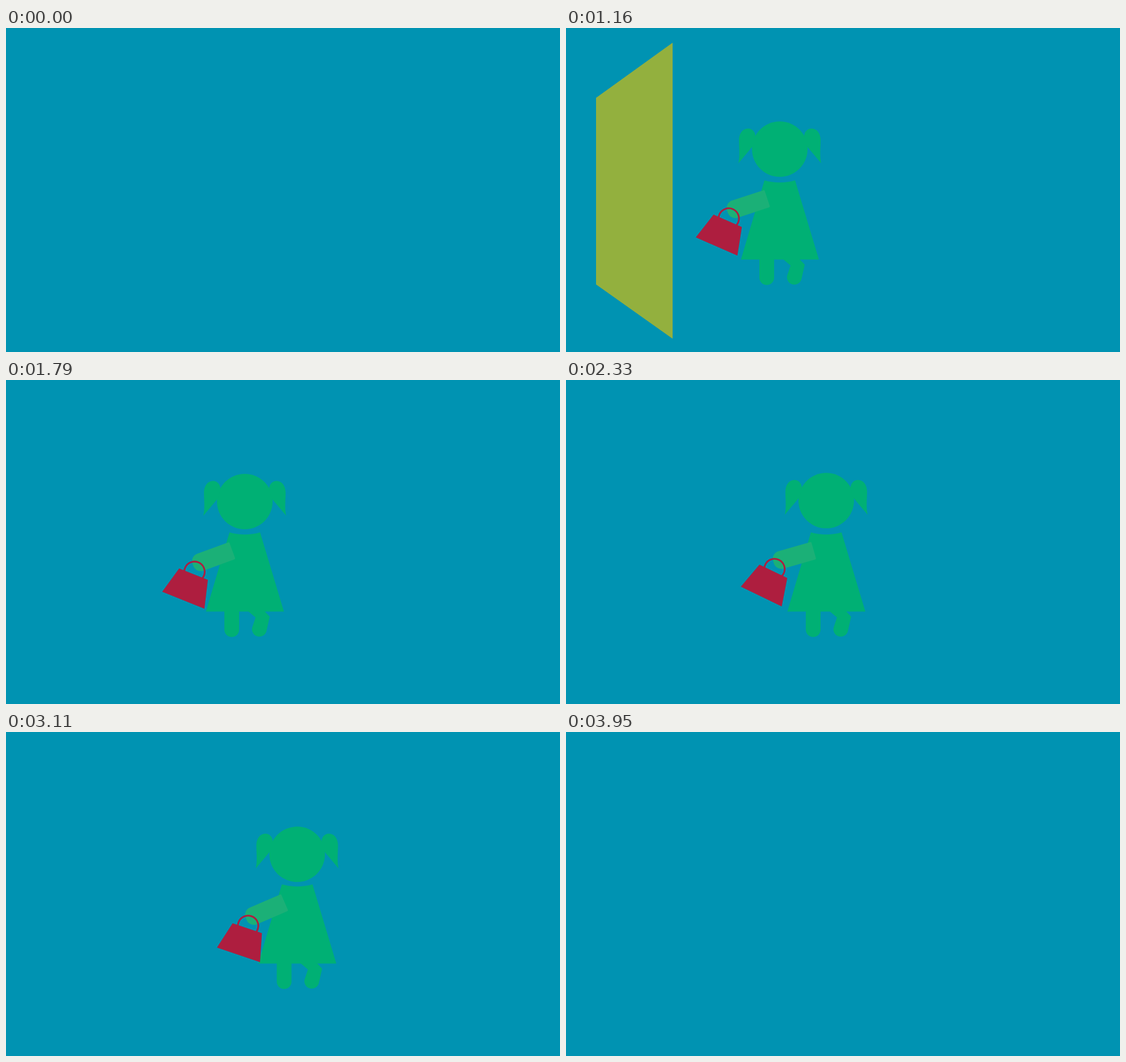
Recreate the animation shown at these times as an HTML page. Size 977x573 px, loop 8 s.

```html
<!DOCTYPE html>
<html lang="en">
<head>
<meta charset="utf-8">
<title>Girl walking through a door</title>
<style>
  html, body { margin: 0; width: 100%; height: 100%; overflow: hidden; background: #0093b2; }
  svg { display: block; width: 100%; height: 100%; }
  #girl { fill: #00b074; }
  #arm { fill: #1bb077; }
  #bag { fill: #ae1e3f; }
</style>
</head>
<body>
<svg viewBox="0 0 977 573">
  <path id="door" fill="#93b03e" d="M53 123.5 188 26V549.5L53 453.5Z" visibility="hidden"/>
  <g id="girl" visibility="hidden">
    <path d="M-27 269.5Q0 277 27 269.5L69 409.5H-68.5Z"/>
    <path d="M-36 408H-10V441.5a13 13 0 0 1-26 0Z"/>
    <path d="M6 409 19 420 13 438a13 13 0 0 0 25 7L44 418.500 35 409Z"/>
    <g id="head">
      <circle r="49"/>
      <path id="tail" d="M-43-22C-43-31-49-36.500-56-36.500C-66-36.500-72-27-72-16C-72-2-70 11-73 25L-47-6Z"/>
      <use href="#tail" transform="scale(-1 1)"/>
    </g>
    <g id="arm">
      <path d="M-2-16H-60a14 14 0 0 0-14 14V2a14 14 0 0 0 14 14H-2a2 2 0 0 0 2-2V-14a2 2 0 0 0-2-2Z"/>
      <g id="bag" transform="translate(-75.6 12.4) rotate(42)">
        <circle r="18" fill="none" stroke="#ae1e3f" stroke-width="3"/>
        <path d="M-27.300 4.500H27.300L40.500 54H-39.700Z"/>
      </g>
    </g>
  </g>
</svg>
<script>
  const LOOP = 8000, STEP = 30, START = 500;
  const [door, girl, head, arm] = ['door', 'girl', 'head', 'arm'].map(id => document.getElementById(id));
  const clamp = v => Math.max(0, Math.min(1, v));
  const show = (el, on) => el.setAttribute('visibility', on ? 'visible' : 'hidden');
  const move = (el, value) => el.setAttribute('transform', value);

  function drawDoor(t) {
    const size = Math.min(clamp((t - 470) / 240), clamp((1425 - t) / 240));
    show(door, t >= START && size > 0);
    move(door, `translate(104 287.5) scale(${size}) translate(-104 -287.5)`);
  }

  function drawGirl(t) {
    const swing = 16.6 - 6.85 * Math.cos((t - 2188) / 600 * 2 * Math.PI);
    show(girl, t >= 830 && t < 3950);
    move(girl, `translate(${295.8 + 0.07 * t} 0)`);
    move(head, `translate(0 ${213.6 + 0.4 * (swing - 16.6)})`);
    move(arm, `translate(-22 301.5) rotate(${-swing})`);
  }

  const origin = performance.now();
  function frame() {
    const time = (performance.now() - origin) % LOOP;
    // The motion runs on a 30 ms beat.
    const t = START + Math.floor((time - START) / STEP) * STEP;
    drawDoor(t);
    drawGirl(t);
    requestAnimationFrame(frame);
  }
  frame();
</script>
</body>
</html>
```
